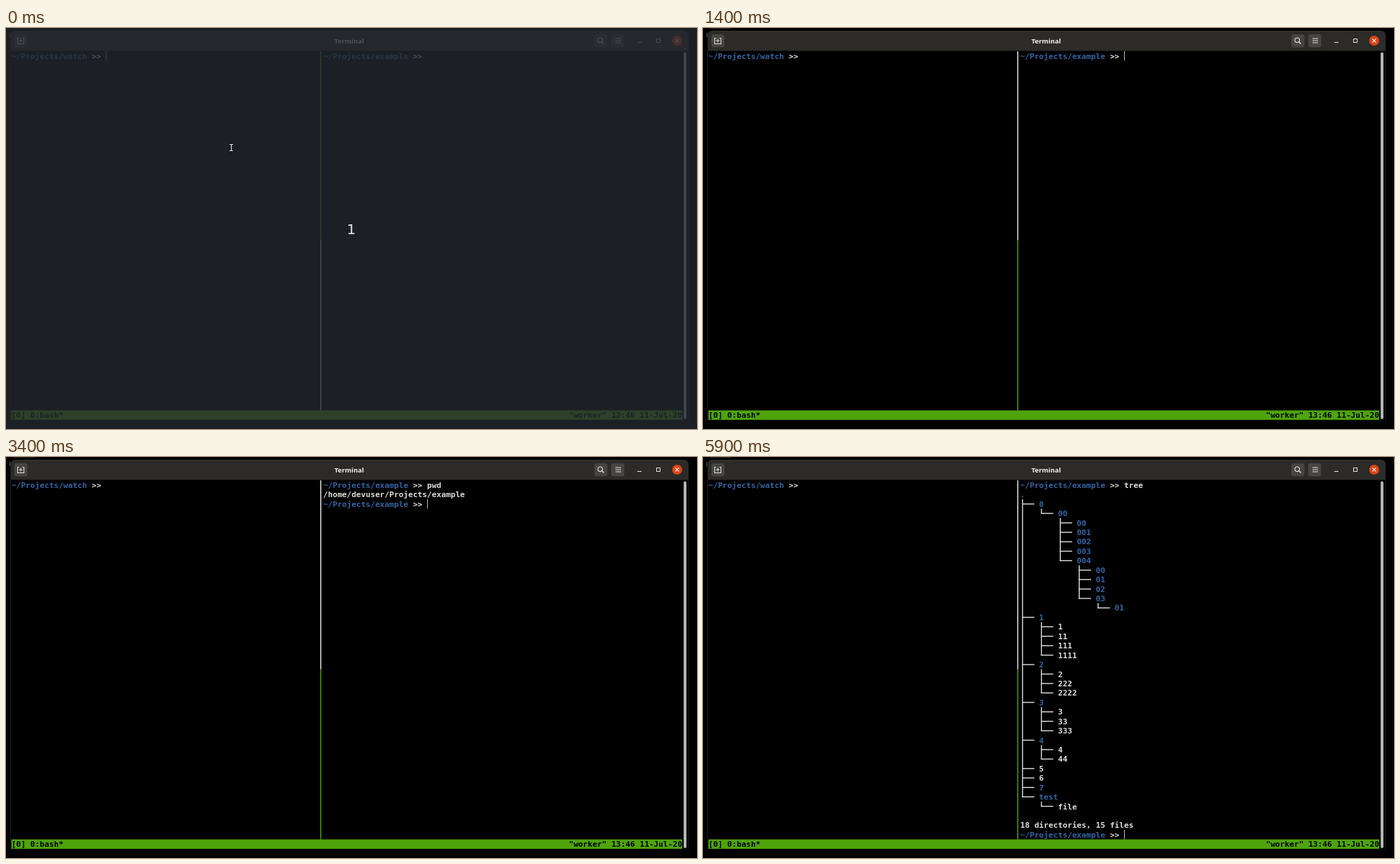
Recreate the animation shown at these times as an HTML page with a canvas. Size 983x570 px, loop 8000 ms.

```html
<!DOCTYPE html>
<html lang="en">
<head>
<meta charset="utf-8">
<title>Terminal</title>
<style>
html, body { margin: 0; width: 100%; height: 100%; overflow: hidden; background: #000; }
canvas { display: block; }
</style>
</head>
<body>
<canvas id="stage" width="983" height="570"></canvas>
<script>
const ctx = document.getElementById('stage').getContext('2d');
const LOOP = 8000;
const CELL_W = 6.72, CELL_H = 13.43, LEFT = 7.7, TOP = 33.2;
const RIGHT_PANE = 66, DIVIDER = 65, COLS = 142, ROWS = 38;
const FG = '#dde0da', BLUE = '#3465a4', GREEN = '#4ea40a';
const MONO = 'bold 11.16px "DejaVu Sans Mono", monospace';

const dir = (name, ...items) => ({ name, items });
const tree = [
  dir('0', dir('00', dir('00'), dir('001'), dir('002'), dir('003'),
    dir('004', dir('00'), dir('01'), dir('02'), dir('03', dir('01'))))),
  dir('1', '1', '11', '111', '1111'),
  dir('2', '2', '222', '2222'),
  dir('3', '3', '33', '333'),
  dir('4', '4', '44'),
  '5', '6', dir('7'), dir('test', 'file')
];

const colX = col => LEFT + col * CELL_W;
const rowY = row => TOP + row * CELL_H;

function rect(x, y, w, h, color) {
  ctx.fillStyle = color;
  ctx.fillRect(x, y, w, h);
}

function round(x, y, w, h, r, color) {
  ctx.fillStyle = color;
  ctx.beginPath();
  ctx.roundRect(x, y, w, h, r);
  ctx.fill();
}

function line(color, width, ...pts) {
  ctx.strokeStyle = color;
  ctx.lineWidth = width;
  ctx.beginPath();
  for (let i = 0; i < pts.length; i += 4) {
    ctx.moveTo(pts[i], pts[i + 1]);
    ctx.lineTo(pts[i + 2], pts[i + 3]);
  }
  ctx.stroke();
}

// Every glyph sits on the terminal's character grid.
function print(col, row, text, color = FG) {
  ctx.font = MONO;
  ctx.textAlign = 'left';
  ctx.fillStyle = color;
  [...text].forEach((ch, i) => {
    if (ch !== ' ') ctx.fillText(ch, colX(col + i), rowY(row) + 10.7);
  });
}

function cursor(col, row) {
  rect(Math.floor(colX(col)), Math.round(rowY(row)), 1, 13.4, '#b4b6b2');
}

function prompt(col, row, folder, typed = '') {
  const path = '~/Projects/' + folder;
  print(col, row, path, BLUE);
  print(col + path.length + 1, row, '>> ' + typed);
  return col + path.length + 4 + typed.length;
}

function printTree(items, col, row) {
  const x = colX(col) + CELL_W / 2;
  const first = row;
  let end = row;
  for (const item of items) {
    const isDir = typeof item !== 'string';
    end = rowY(row) + CELL_H / 2;
    rect(x - 0.7, end - 0.7, CELL_W * 2.5 + 0.7, 1.4, FG);
    print(col + 4, row, isDir ? item.name : item, isDir ? BLUE : FG);
    row++;
    if (isDir && item.items.length) row = printTree(item.items, col + 4, row);
  }
  rect(x - 0.7, rowY(first), 1.4, end + 0.7 - rowY(first), FG);
  return row;
}

function drawWindow() {
  rect(0, 0, 983, 570, '#000');
  rect(11, 0, 29, 1, '#2a2a2a');
  rect(5, 7, 1, 6, '#50506a');
  rect(6, 32, 1, 526, '#191919');
  rect(970, 32, 1, 526, '#191919');
  round(6.5, 4, 964.5, 28.5, [6, 6, 0, 0], '#2c2b28');
  rect(12, 4, 953, 1, '#383734');

  ctx.font = 'bold 9.5px "Noto Sans", sans-serif';
  ctx.textAlign = 'center';
  ctx.fillStyle = '#f2f2f0';
  ctx.fillText('Terminal', 488.2, 21.6);

  for (const x of [12, 837, 861]) round(x, 9, 18.5, 18.5, 3, '#464542');
  const icon = '#e4e4e2';
  line(icon, 1, 18.5, 14.5, 16.5, 14.5, 16.5, 14, 16.5, 23,
    16, 22.5, 26, 22.5, 25.5, 23, 25.5, 14, 25.5, 14.5, 23.5, 14.5,
    21, 15.5, 21, 20.5, 18.5, 18, 23.5, 18);
  ctx.lineWidth = 1.1;
  ctx.beginPath();
  ctx.arc(845.3, 17.3, 3.3, 0, Math.PI * 2);
  ctx.stroke();
  line(icon, 1.3, 847.7, 19.7, 850.5, 22.5);
  line(icon, 1, 867, 15, 875, 15, 867, 18, 875, 18, 867, 21, 875, 21);
  line(icon, 1, 898, 20.5, 904, 20.5);
  ctx.strokeRect(925.5, 15.5, 5, 5);

  ctx.fillStyle = '#dd4518';
  ctx.beginPath();
  ctx.arc(954.8, 18, 7.1, 0, Math.PI * 2);
  ctx.fill();
  line('#f6e6e0', 1.1, 952.3, 15.5, 957.3, 20.5, 957.3, 15.5, 952.3, 20.5);

  round(964, 34.5, 4, 521.5, 2, '#b5b5b2');
}

function drawPanes(rightActive) {
  const x = colX(DIVIDER) + CELL_W / 2 - 0.8;
  const mid = rowY(20), end = rowY(ROWS);
  rect(x, TOP, 1.4, mid - TOP, rightActive ? '#eeeeec' : GREEN);
  rect(x, mid, 1.4, end - mid, rightActive ? GREEN : '#eeeeec');

  rect(LEFT, end, COLS * CELL_W, CELL_H, GREEN);
  print(0, ROWS, '[0] 0:bash*', '#000');
  const status = '"worker" 13:46 11-Jul-20';
  print(COLS - status.length, ROWS, status, '#000');
}

function drawSession(t) {
  const rightActive = t >= 1400;
  const shell = (row, typed) => prompt(RIGHT_PANE, row, 'example', typed);
  drawPanes(rightActive);
  const leftEnd = prompt(0, 0, 'watch');
  if (!rightActive) cursor(leftEnd, 0);

  if (t < 3400) {
    const end = shell(0, t < 3000 ? '' : t < 3200 ? 'pw' : 'pwd');
    if (rightActive) cursor(end, 0);
  } else if (t < 5900) {
    shell(0, 'pwd');
    print(RIGHT_PANE, 1, '/home/devuser/Projects/example');
    const count = t < 4800 ? 0 : t < 4900 ? 1 : t < 5400 ? 3 : 4;
    const end = shell(2, 'tree'.slice(0, count));
    if (t < 5600) cursor(end, 2);
    else cursor(RIGHT_PANE, 3);
  } else {
    shell(0, 'tree');
    print(RIGHT_PANE, 1, '.', BLUE);
    const row = printTree(tree, RIGHT_PANE, 2);
    print(RIGHT_PANE, row + 1, '18 directories, 15 files');
    cursor(shell(row + 2), row + 2);
  }
}

function drawCountdown() {
  rect(0, 0, 983, 570, 'rgba(36, 41, 48, 0.8)');
  ctx.font = '20px "DejaVu Sans", sans-serif';
  ctx.textAlign = 'center';
  ctx.fillStyle = '#e8eaea';
  ctx.fillText('1', 491, 293);
}

function drawPointer() {
  const beam = [318, 165.5, 323, 165.5, 320.5, 165, 320.5, 175, 318, 174.5, 323, 174.5];
  line('#000', 2.4, ...beam);
  line('#f0f0f0', 1.2, ...beam);
}

function frame() {
  const t = performance.now() % LOOP;
  drawWindow();
  drawSession(t);
  if (t < 100) drawCountdown();
  if (t < 1000) drawPointer();
  requestAnimationFrame(frame);
}
frame();
</script>
</body>
</html>
```
